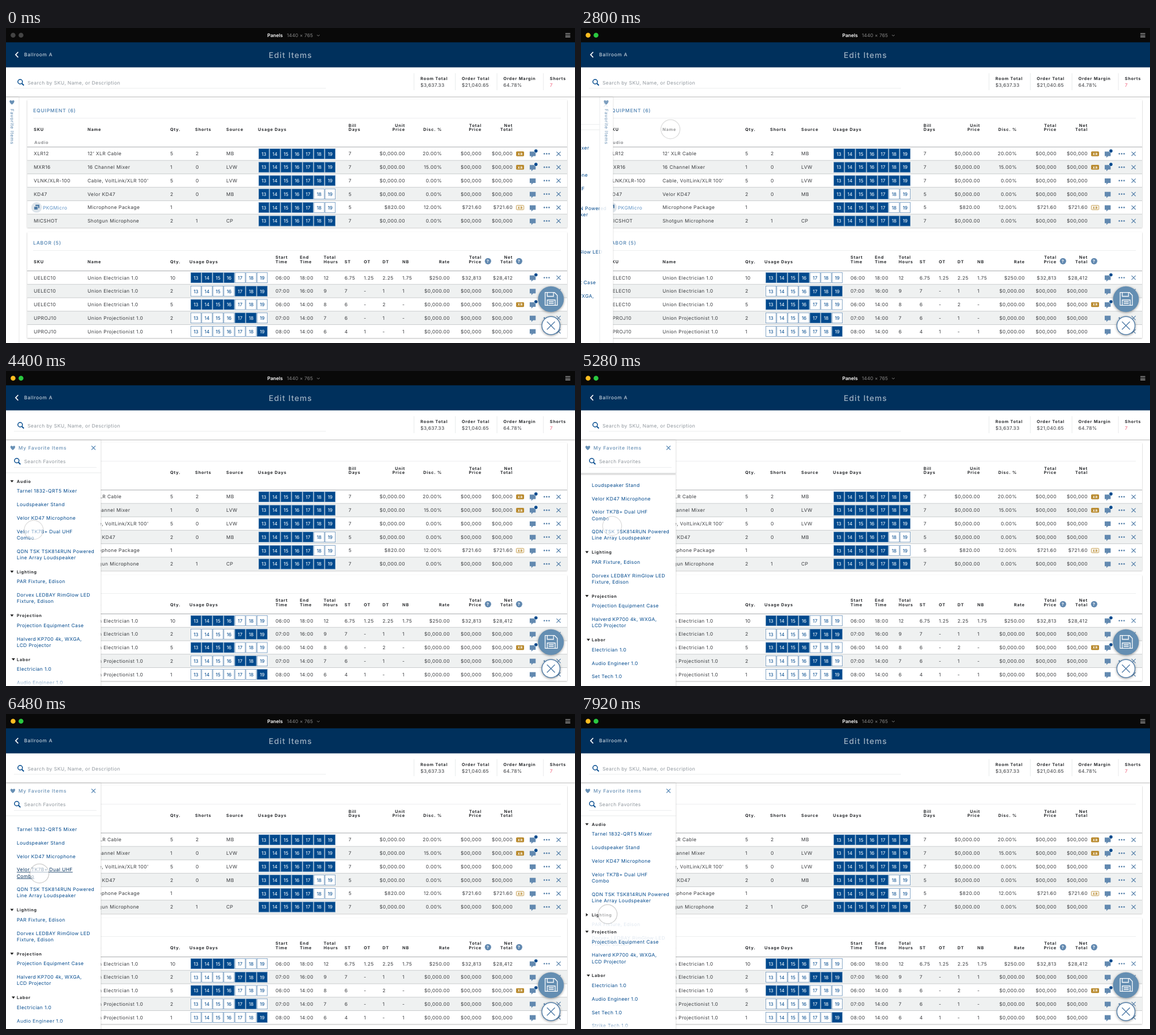
Recreate the animation shown at these times as an HTML page. Size 1005x557 px, loop 8 s.

```html
<!DOCTYPE html>
<html lang="en">
<head>
<meta charset="utf-8">
<title>Edit Items</title>
<style>
html, body { margin: 0; width: 100%; height: 100%; overflow: hidden; background: #fff; }
svg { display: block; }
text { font: 400 8.5px Inter, sans-serif; letter-spacing: .4px; fill: #3b3d40; text-rendering: geometricPrecision; white-space: pre; }
.head { font-size: 7.4px; font-weight: 700; letter-spacing: .8px; fill: #2b2d30; }
.sub { fill: #8b8d90; }
.title { font-size: 8.6px; font-weight: 500; letter-spacing: .8px; fill: #4a7fb0; }
.fav { font-weight: 500; letter-spacing: .75px; fill: #6890b5; }
.item text { fill: #00498d; }
.item.hover text { fill: #002f5c; text-decoration: underline; }
.hint { fill: #8f969d; }
.day { fill: #00498d; letter-spacing: 0; }
.day.on { fill: #fff; }
.tiny { font-size: 6px; font-weight: 700; letter-spacing: .5px; }
.white { fill: #fff; }
.card { fill: #fff; filter: drop-shadow(0 1px 1px rgba(0,0,0,.28)); }
.float { filter: drop-shadow(0 1px 2px rgba(0,0,0,.4)); }
</style>
</head>
<body>
<svg id="stage" width="1005" height="557" viewBox="0 0 1005 557"></svg>
<script>
const text = (x, y, str, cls = '', anchor = 'start', extra = '') =>
  `<text x="${x}" y="${y}" dy=".36em" class="${cls}" text-anchor="${anchor}" ${extra}>${str}</text>`;
const rect = (x, y, w, h, fill, extra = '') =>
  `<rect x="${x}" y="${y}" width="${w}" height="${h}" fill="${fill}" ${extra}/>`;
const path = (d, stroke, width = 1, extra = '') =>
  `<path d="${d}" fill="none" stroke="${stroke}" stroke-width="${width}" ${extra}/>`;
const circle = (x, y, r, fill, extra = '') =>
  `<circle cx="${x}" cy="${y}" r="${r}" fill="${fill}" ${extra}/>`;
const cross = (x, y, r, color, width = 1.2) =>
  path(`M${x - r} ${y - r}l${2 * r} ${2 * r}m0 ${-2 * r}l${-2 * r} ${2 * r}`, color, width);
const heart = (x, y) =>
  `<path transform="translate(${x} ${y})" d="M0 4C-7 -.8 -4 -6 0 -2.6C4 -6 7 -.8 0 4z" fill="#6890b5"/>`;
const magnifier = (x, y) =>
  circle(x - 1, y - 1, 4, 'none', 'stroke="#00498d" stroke-width="1.5"') +
  path(`M${x + 2} ${y + 2}l3.5 3.5`, '#00498d', 1.8);

// Header labels: [x, label, anchor]; "|" splits lines, the last one sits on y.
const headers = (y, list) => list.map(([x, label, anchor]) =>
  label.split('|').reverse().map((s, i) => text(x, y - i * 7.6, s, 'head', anchor)).join('')).join('');

function days(x, y, first, last) {
  let out = '';
  for (let d = 13; d <= 19; d++, x += 19.5) {
    const on = d >= first && d <= last;
    out += rect(x + .4, y - 9, 18.2, 18, on ? '#00498d' : '#fff', 'stroke="#6b93bb" stroke-width=".8"') +
      text(x + 9.5, y + .2, d, on ? 'day on' : 'day', 'middle');
  }
  return out;
}

// Flags: x = solid badge, o = outlined badge, d = unread dot.
function actions(y, flags) {
  let out = '';
  if (/[xo]/.test(flags)) {
    const solid = flags.includes('x');
    out += rect(901.4, y - 3.7, 13.2, 7.6, solid ? '#b48322' : '#fff', 'rx="1" stroke="#bd8f35" stroke-width=".9"') +
      text(908.2, y + .2, 'XR', 'tiny', 'middle', `style="fill:${solid ? '#fff' : '#b48322'}"`);
  }
  out += `<path d="M925 ${y - 4}h10.5v8h-4.5l-3 3v-3h-3z" fill="#6289b0"/>`;
  if (flags.includes('d')) out += circle(936, y - 5, 3.3, '#fff') + circle(936, y - 5, 2.8, '#00498d');
  for (const x of [950.8, 955, 959.2]) out += circle(x, y, 1.3, '#5580aa');
  return out + cross(976, y, 3.6, '#5580aa');
}

function table(top, height, title, firstRow, rows, cells) {
  let out = rect(37.5, top, 953.5, height, '#fff', 'class="card"') +
    text(48, top + 19, title, 'title') + path(`M48 ${top + 32.4}H980`, '#eceeef');
  rows.forEach((row, i) => {
    const y = firstRow + i * 23.75;
    if (i % 2) out += rect(37.5, y - 11.8, 953.5, 23.6, '#eff1f1');
    out += path(`M37.5 ${y - 12}H991`, i ? '#c9cccd' : '#a9acae');
    out += cells(row, y) + actions(y, row.at(-1));
  });
  return out;
}
const columns = (row, y, starts, ends) =>
  starts.map((x, i) => text(x, y, row[i])).join('') +
  ends.map((x, i) => text(x, y, row[starts.length + i], '', 'end')).join('');

const zero = '$0,000.00', cost = '$00,000';
const equipment = [
  [13, 19, 'XLR12', '12’ XLR Cable', 5, 2, 'MB', 7, zero, '20.00%', cost, cost, 'xd'],
  [13, 19, 'MXR16', '16 Channel Mixer', 1, 0, 'LVW', 7, zero, '15.00%', cost, cost, 'xd'],
  [13, 19, 'VLNK/XLR-100', 'Cable, VoltLink/XLR 100’', 5, 0, 'LVW', 7, zero, '0.00%', cost, cost, ''],
  [13, 17, 'KD47', 'Velor KD47', 2, 0, 'MB', 5, zero, '0.00%', cost, cost, ''],
  [13, 17, '', 'Microphone Package', 1, '', '', 5, '$820.00', '12.00%', '$721.60', '$721.60', 'o'],
  [13, 19, 'MICSHOT', 'Shotgun Microphone', 2, 1, 'CP', 7, zero, '0.00%', cost, cost, '']
];
const electrician = 'Union Electrician 1.0', projectionist = 'Union Projectionist 1.0';
const labor = [
  [13, 16, 'UELEC10', electrician, 10, '06:00', '18:00', 12, 6.75, 1.25, 2.25, 1.75, '$250.00', '$32,813', '$28,412', 'd'],
  [17, 19, 'UELEC10', electrician, 2, '07:00', '16:00', 9, 7, '-', 1, 1, zero, cost, cost, ''],
  [13, 16, 'UELEC10', electrician, 5, '06:00', '14:00', 8, 6, '-', 2, '-', zero, cost, cost, 'xd'],
  [17, 18, 'UPROJ10', projectionist, 2, '07:00', '14:00', 7, 6, '-', 1, '-', zero, cost, cost, ''],
  [19, 19, 'UPROJ10', projectionist, 1, '08:00', '14:00', 6, 4, 1, '-', 1, zero, cost, cost, '']
];

const tables =
  table(127, 225.5, 'EQUIPMENT (6)', 222.4, equipment, (r, y) => days(446, y, r[0], r[1]) +
    columns(r.slice(2), y, [49, 144, 290, 335, 389, 605], [705, 770, 840, 895])) +
  headers(179.6, [[49, 'SKU'], [144, 'Name'], [290, 'Qty.'], [334, 'Shorts'], [389, 'Source'], [445, 'Usage Days'],
    [605, 'Bill|Days'], [705, 'Unit|Price', 'end'], [770, 'Disc. %', 'end'], [840, 'Total|Price', 'end'], [895, 'Net|Total', 'end']]) +
  text(50, 202, 'Audio', 'head sub') +
  circle(54, 317.3, 9.3, '#dde4ea') + rect(52, 312.5, 7, 6, '#4f7ba6') +
  rect(49.3, 315.5, 7, 6, '#4f7ba6', 'stroke="#dde4ea"') + text(65, 317.5, 'PKGMicro', '', 'start', 'style="fill:#5f93c6"') +
  table(361, 187, 'LABOR (5)', 441.5, labor, (r, y) => days(326, y, r[0], r[1]) +
    columns(r.slice(2), y, [49, 144, 290, 476, 519, 561, 598, 632, 665, 700], [784, 840, 895])) +
  headers(413.2, [[49, 'SKU'], [144, 'Name'], [290, 'Qty.'], [324, 'Usage Days'], [476, 'Start|Time'], [519, 'End|Time'],
    [561, 'Total|Hours'], [598, 'ST'], [632, 'OT'], [665, 'DT'], [700, 'NB'], [784, 'Rate', 'end'],
    [840, 'Total|Price', 'end'], [895, 'Net|Total', 'end']]) +
  [851.3, 906.3].map(x => circle(x, 412.3, 5.6, '#6289b0') + text(x, 412.4, '?', 'head white', 'middle')).join('');

const favorites = [
  ['Audio', 'Tarnel 1832-QRT5 Mixer', 'Loudspeaker Stand', 'Velor KD47 Microphone', 'Velor TK7B+ Dual UHF|Combo', 'QDN TSK TSK814RUN Powered|Line Array Loudspeaker'],
  ['Lighting', 'PAR Fixture, Edison', 'Dorvex LEDBAY RimGlow LED|Fixture, Edison'],
  ['Projection', 'Projection Equipment Case', 'Halverd KP700 4k, WXGA,|LCD Projector'],
  ['Labor', 'Electrician 1.0', 'Audio Engineer 1.0', 'Set Tech 1.0', 'Strike Tech 1.0']
];
const boxes = []; // vertical extent of each favourite, for hovering
function favoriteList() {
  let y = 195, out = '';
  favorites.forEach(([name, ...items], s) => {
    if (s === 2) out += '<g id="below">';
    out += `<path d="M-3 -1.8H3L0 2z" fill="#222" transform="translate(${s === 3 ? 13 : 10.5} ${y})" ${s === 1 ? 'id="arrow"' : ''}/>` +
      text(19, y, name, 'head');
    if (s === 1) favorites.foldY = y;
    y += 17.4;
    out += s === 1 ? '<g id="folding">' : '<g>';
    for (const item of items) {
      const lines = item.split('|');
      boxes.push([y - 7, y + lines.length * 11.4 - 4.5]);
      out += `<g class="item">${lines.map((l, i) => text(19, y + i * 11.3, l)).join('')}</g>`;
      y += lines.length > 1 ? 34.8 : 23.8;
    }
    out += '</g>';
    y += 1.5;
  });
  return out + '</g>';
}

const panel = `<g id="panel">
  ${rect(-10, 122, 177.4, 440, '#fff', 'style="filter:drop-shadow(.5px 0 1px rgba(0,0,0,.25))"')}
  <g clip-path="url(#listClip)"><g id="list">${favoriteList()}</g></g>
  ${rect(0, 542, 167, 15, 'url(#fade)')}
  ${rect(0, 181, 167, 4, 'url(#drop)', 'id="listShadow"')}
  ${path('M0 180H167', '#e8eaeb')}
  ${heart(12, 136)}${text(22, 136, 'My Favorite Items', 'fav')}${cross(154.5, 135.8, 3.5, '#4a7fb0')}
  ${magnifier(20, 159.5)}${text(32, 159.8, 'Search Favorites', 'hint')}${path('M14 170.5H160', '#eceeef')}
  <g id="tab">${rect(144, 122, 23.4, 440, '#fff')}${path('M144 122V557', '#e8eaec')}
    ${heart(155.5, 131.5)}${text(0, 0, 'Favorite Items', 'fav', 'start', 'transform="translate(155.5 143) rotate(90)" style="font-size:8px;letter-spacing:.65px"')}</g>
</g>`;

const stats = [[732, 'Room Total', '$3,637.33'], [805, 'Order Total', '$21,040.65'], [878.5, 'Order Margin', '64.78%'], [960.5, 'Shorts', '7']];
const chrome =
  rect(0, 69, 1005, 52, '#fff', 'style="filter:drop-shadow(0 1px 1.2px rgba(0,0,0,.28))"') +
  magnifier(26, 96) + text(38, 97, 'Search by SKU, Name, or Description', 'hint') + path('M14 106.5H565', '#eceeef') +
  stats.map(([x, label, value], i) => path(`M${x - 11.3} 80V110`, '#e8eaeb') + text(x, 89.5, label, 'head') +
    text(x, 101, value, '', 'start', `style="letter-spacing:.3px${i === 3 ? ';fill:#f0607c' : ''}"`)).join('') +
  rect(0, 25, 1005, 44.6, '#00305c') +
  path('M21.5 42.5L17 47.2L21.5 52', '#fff', 1.7) +
  text(32, 47.3, 'Ballroom A', '', 'start', 'style="fill:#e4eaf0;letter-spacing:.7px"') +
  text(502.5, 48, 'Edit Items', '', 'middle', 'style="font-size:14px;font-weight:500;letter-spacing:1.1px;fill:#9cafc1"') +
  rect(0, 0, 1005, 25.3, '#090909') +
  circle(12.5, 12.7, 4.3, '#444', 'class="light"') + circle(26.5, 12.7, 4.3, '#444', 'class="light"') +
  text(461.5, 12.6, 'Panels', '', 'start', 'style="font-weight:600;letter-spacing:0;fill:#fff"') +
  text(496, 12.6, '1440 × 765', '', 'start', 'style="letter-spacing:.1px;fill:#858585"') +
  path('M549.3 12l2.3 2.3l2.3 -2.3', '#858585') +
  path('M988 9.8h8.6m-8.6 2.9h8.6m-8.6 2.9h8.6', '#ccc', 1.1);

const buttons =
  `<g class="float">${circle(962.5, 479.5, 22.8, '#648eb2')}</g>` +
  path('M952.3 467.7h16.5l5 5v17.6h-21.5zM956 468v6.5h11v-6.5M956 490v-9h14v9M958.5 484h9M958.5 487h9', '#fff', 1.3) +
  `<g class="float">${circle(962.5, 526.3, 16, '#fff', 'stroke="#5580aa" stroke-width="1.4"')}</g>` +
  cross(962.5, 526.3, 7, '#4a78a5', 1.3);

const stage = document.getElementById('stage');
stage.innerHTML = `<defs>
  <clipPath id="listClip"><rect x="0" y="190.5" width="167" height="370"/></clipPath>
  <linearGradient id="fade" x2="0" y2="1"><stop stop-color="#fff" stop-opacity="0"/><stop offset="1" stop-color="#fff"/></linearGradient>
  <linearGradient id="drop" x2="0" y2="1"><stop stop-color="#000" stop-opacity=".2"/><stop offset="1" stop-color="#000" stop-opacity="0"/></linearGradient>
  </defs>${tables}${panel}${chrome}${buttons}
  <circle id="cursor" r="16.8" stroke="#000" stroke-width="1.3"/>`;
const $ = id => document.getElementById(id);
const items = [...stage.querySelectorAll('.item')];
const lights = stage.querySelectorAll('.light');

// Keys: [time, ...values]
const cursorKeys = [[0, 360, 540], [80, 300, 420], [240, 176, 190], [320, 176, 190], [640, 60, 186], [720, 60, 186],
  [1120, 12, 178], [1280, 12, 178], [1760, 258, 178], [2480, 258, 178], [2800, 158, 179], [3040, 116, 180], [3440, 112, 181],
  [3840, 258, 184], [4000, 258, 188], [4320, 55, 279], [4400, 49, 281], [4880, 54, 210], [5280, 55, 274], [5440, 55, 288],
  [5920, 57, 205], [6400, 59, 281], [6480, 59, 282], [6880, 60, 283], [7360, 47, 354]];
const panelKeys = [[1280, -145], [1680, 0], [2480, 0], [2800, -111], [2960, -145], [3440, -145], [3840, 0]];
const scrollKeys = [[4400, 0], [4880, -98], [5280, -34.5], [5440, -20], [5920, -100], [6400, -14], [6480, -8.5], [6720, 0]];
const pressed = [[1200, 1760], [2480, 3040], [3440, 4000], [4320, 6320], [7440, 7600]];

function at(keys, t) {
  if (t <= keys[0][0]) return keys[0].slice(1);
  const i = keys.findIndex(k => k[0] > t);
  if (i < 0) return keys.at(-1).slice(1);
  const a = keys[i - 1], b = keys[i], f = (t - a[0]) / (b[0] - a[0]);
  return a.slice(1).map((v, n) => v + (b[n + 1] - v) * f);
}

function draw(t) {
  const [x, y] = at(cursorKeys, t), [slide] = at(panelKeys, t), [scroll] = at(scrollKeys, t);
  const open = 1 + slide / 145;
  const down = pressed.some(([a, b]) => t >= a && t < b);

  lights.forEach((l, i) => l.setAttribute('fill', t < 400 ? '#444' : ['#fdbd20', '#2ac940'][i]));
  $('panel').setAttribute('transform', `translate(${slide})`);
  $('tab').setAttribute('opacity', 1 - open ** 1.3);
  $('list').setAttribute('transform', `translate(0 ${scroll})`);
  $('listShadow').setAttribute('opacity', Math.min(1, Math.max(0, (-scroll - 9) / 12)));

  const f = Math.max(0, Math.min(1, (t - 7440) / 480)), fold = f * f * (3 - 2 * f);
  $('below').setAttribute('transform', `translate(0 ${-47.3 * fold})`);
  $('folding').setAttribute('opacity', 1 - .88 * fold);
  $('arrow').setAttribute('transform', `translate(10.5 ${favorites.foldY}) rotate(${-90 * fold})`);

  const hovering = !down && open === 1 && x > 19 && x < 156;
  items.forEach((el, i) => el.classList.toggle('hover',
    hovering && y > boxes[i][0] + scroll && y < boxes[i][1] + scroll));

  const c = $('cursor');
  c.setAttribute('transform', `translate(${x} ${y})`);
  c.setAttribute('opacity', t < 80 ? 0 : 1);
  c.setAttribute('fill', `rgba(255,255,255,${down ? .5 : .6})`);
  c.setAttribute('stroke-opacity', down ? .14 : .2);
}

const start = performance.now();
function tick(now) {
  draw(Math.floor(Math.max(0, now - start) % 8000 / 80) * 80);
  requestAnimationFrame(tick);
}
draw(0);
requestAnimationFrame(tick);
</script>
</body>
</html>
```
